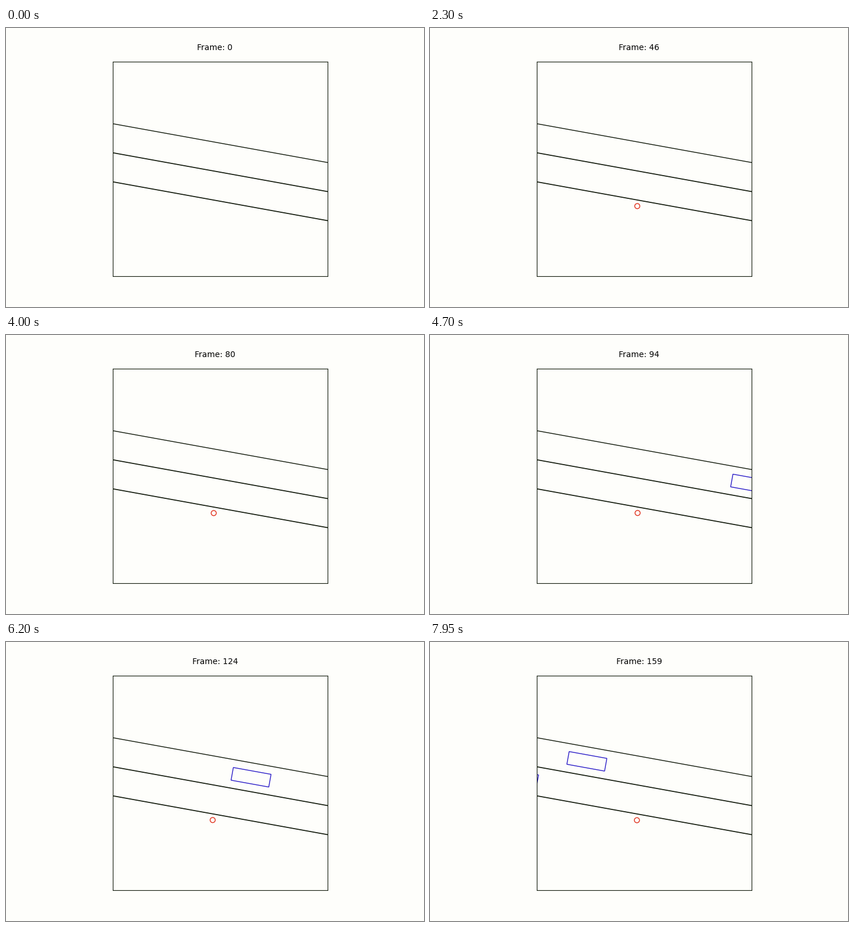
A matplotlib script for the animation above (8 s loop, 720 by 480 pixels).

```python
import numpy as np
import matplotlib.pyplot as plt
from matplotlib.animation import FuncAnimation
from matplotlib.patches import Circle, Polygon

FRAMES, STEP_MS = 160, 50
LEFT, RIGHT, TOP, BOTTOM = 184.2, 553.8, 57.6, 427.2
PAPER, INK = "#fefefb", "#10180a"
SLOPE = 0.1805
SPEED = 4.34  # horizontal pixels per frame

ALONG = np.array([1, SLOPE]) / np.hypot(1, SLOPE)
ACROSS = np.array([-ALONG[1], ALONG[0]])
CAR_LEN, CAR_WID = 66.0, 22.2

# Walker: approaches the kerb, then sways while waiting
WALK_T = [1, 24, 25, 65, 94, 124, 145, 159]
WALK_X = [350.7, 355.8, 356, 358, 357.6, 356, 356.3, 356.4]
WALK_Y = [336, 306.3, 306.2, 306.6, 306.2, 306.3, 306.9, 306.6]

fig = plt.figure(figsize=(7.2, 4.8), dpi=100, facecolor=PAPER)
ax = fig.add_subplot(facecolor=PAPER)
ax.set_aspect("equal")
ax.set(xlim=(LEFT, RIGHT), ylim=(BOTTOM, TOP), xticks=[], yticks=[])
ax.spines[:].set_color(INK)


def road_line(y, width):
    ax.plot([LEFT, RIGHT], [y, y + SLOPE * (RIGHT - LEFT)], color=INK, lw=width)


def make_car():
    return ax.add_patch(Polygon(np.zeros((4, 2)), fill=False, ec="#2a1cc8", lw=1))


def car_corners(corner):
    """Outline of a car from its upper left corner."""
    a, b = CAR_LEN * ALONG, CAR_WID * ACROSS
    return corner + np.array([0 * a, a, a + b, b])


for y, width in ((164.7, 1.0), (214.7, 1.2), (264.7, 1.2)):
    road_line(y, width)

far_car, near_car = make_car(), make_car()
walker = ax.add_patch(Circle((0, 0), 4.4, fill=False, ec="#e0301c", lw=1))
label = fig.text(0.5, 0.92, "", ha="center", fontsize=10, color="black")


def draw(n):
    x = 391.6 - SPEED * (n - 124)
    far_car.set_xy(car_corners(np.array([x, 216 + SLOPE * (x - 392)])))

    x = 187 + SPEED * (n - 159)
    nose = np.array([x, 228.7 + SLOPE * (x - 187)])
    near_car.set_xy(car_corners(nose - CAR_LEN * ALONG))

    walker.set_visible(n > 0)
    walker.center = np.interp(n, WALK_T, WALK_X), np.interp(n, WALK_T, WALK_Y)
    label.set_text(f"Frame: {n}")
    return far_car, near_car, walker, label


anim = FuncAnimation(fig, draw, frames=FRAMES, interval=STEP_MS,
                     repeat=True, repeat_delay=0)
plt.show()
```
